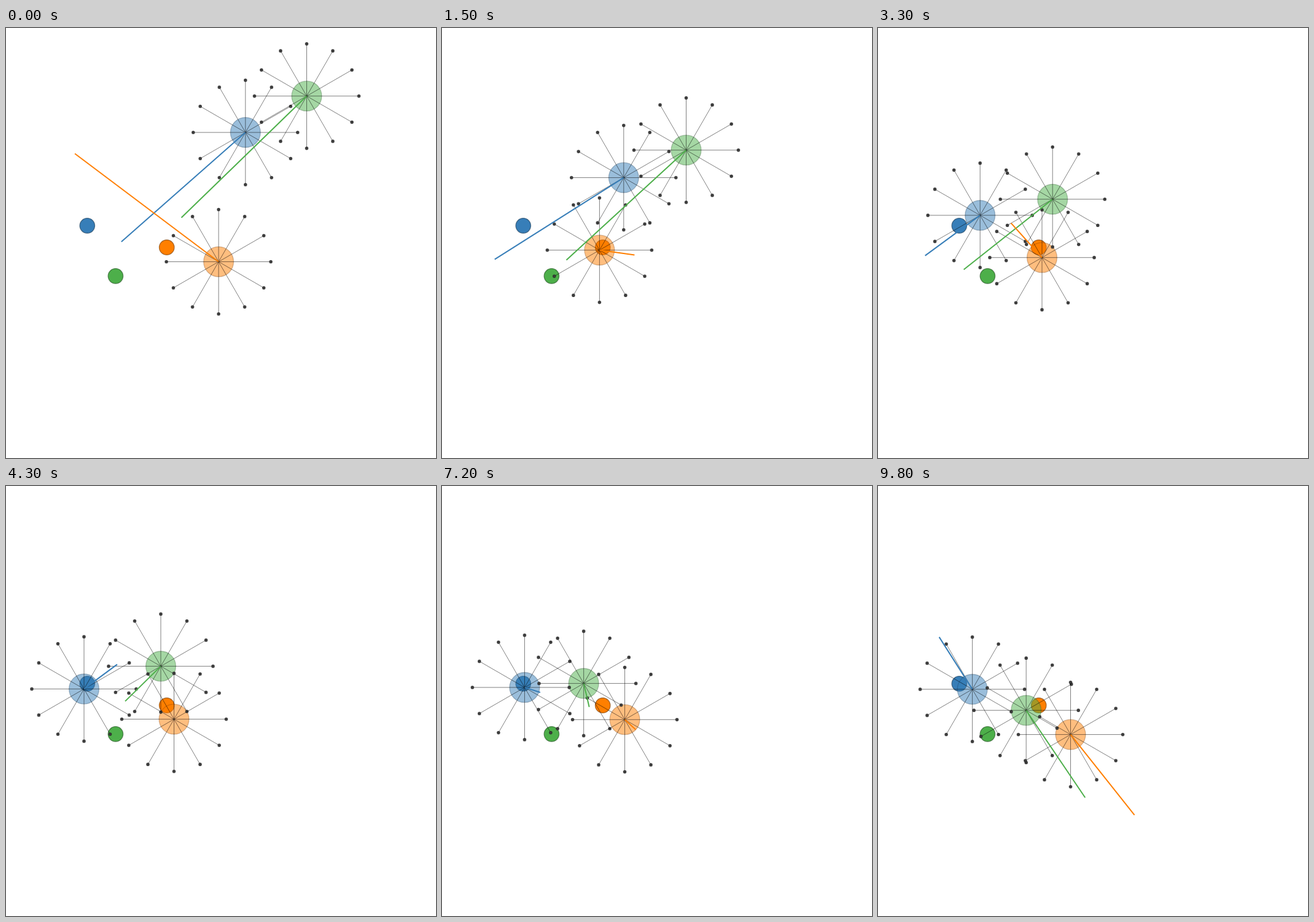
An HTML page with a canvas that plays this animation: 700 px wide and 700 px high, repeating every 9900 ms.

```html
<!DOCTYPE html>
<html>
<head>
<meta charset="utf-8">
<style>
  html, body { margin: 0; width: 100%; height: 100%; overflow: hidden; background: #fff; }
  canvas { display: block; }
</style>
</head>
<body>
<canvas id="stage" width="700" height="700"></canvas>
<script>
const ctx = document.getElementById('stage').getContext('2d');
const STEP = 100, STEPS = 99, TAU = Math.PI * 2;
const BODY = 24.4, GOAL = 12.2, REACH = 85, RAYS = 12;

// Steps at which the agents change course
const turns = [0, 15, 24, 43, 59, 84, 98];

// Position and thrust at each turn
const agents = [
  { rgb: [55, 126, 184], goal: [132.3, 321.8],
    x: [389.8, 295.8, 228.5, 127, 130, 140.5, 153.6],
    y: [170, 243.6, 269.2, 330.4, 329.7, 326.7, 330.9],
    dx: [-202, -210, -212, 54, 0, 48, -54],
    dy: [178, 133, 156, -40, 0, 11, -85] },
  { rgb: [77, 175, 74], goal: [178.4, 403.8],
    x: [489.5, 397.5, 331, 252, 240, 226, 241.2],
    y: [110.8, 198.8, 259, 293.4, 312.4, 331.2, 365.2],
    dx: [-204, -195, -198, -58, 1, 17, 96],
    dy: [198, 179, 166, 57, 38, 39, 142] },
  { rgb: [255, 127, 0], goal: [261.7, 357.2],
    x: [346.1, 256.4, 262, 273.5, 294, 300.7, 313.5],
    y: [380.5, 361.6, 366, 379.6, 378.2, 384.9, 404.6],
    dx: [-234, 57, -88, 0, 12, 25, 104],
    dy: [-176, 8, -98, 0, 13, 20, 131] }
];

// Distance covered from rest under steady thrust, with 25% damping per step
const travel = n => n - 3 * (1 - 0.75 ** n);
const knots = turns.map(travel);

// Tangent that never overshoots its neighbours
function slope(values, i) {
  const secant = j => (values[j + 1] - values[j]) / (knots[j + 1] - knots[j]);
  if (i === 0) return secant(0);
  if (i === values.length - 1) return secant(i - 1);
  const a = secant(i - 1), b = secant(i);
  return a * b <= 0 ? 0 : 2 * a * b / (a + b);
}

function sample(values, step) {
  let i = 0;
  while (i < turns.length - 2 && turns[i + 1] <= step) i++;
  const span = knots[i + 1] - knots[i];
  const u = (travel(step) - knots[i]) / span, v = 1 - u;
  return v * v * (1 + 2 * u) * values[i] + u * u * (3 - 2 * u) * values[i + 1] +
    span * u * v * (v * slope(values, i) - u * slope(values, i + 1));
}

function line(x, y, dx, dy, color, width) {
  ctx.beginPath();
  ctx.moveTo(x, y);
  ctx.lineTo(x + dx, y + dy);
  ctx.strokeStyle = color;
  ctx.lineWidth = width;
  ctx.stroke();
}

function disc(x, y, radius, rgb, alpha) {
  ctx.beginPath();
  ctx.arc(x, y, radius, 0, TAU);
  ctx.fillStyle = `rgba(${rgb}, ${alpha})`;
  ctx.fill();
  ctx.strokeStyle = `rgba(${rgb.map(c => c / 2 | 0)}, ${alpha * 0.65})`;
  ctx.lineWidth = 1.3;
  ctx.stroke();
}

// Length of a ray until it meets another agent's body
function rayLength(from, cos, sin, poses) {
  let length = REACH;
  for (const other of poses) {
    if (other === from) continue;
    const ox = other.x - from.x, oy = other.y - from.y;
    const along = ox * cos + oy * sin, across = ox * sin - oy * cos;
    if (along > 0 && Math.abs(across) < BODY)
      length = Math.min(length, along - Math.sqrt(BODY ** 2 - across ** 2));
  }
  return Math.max(length, 0);
}

function sensors(pose, poses) {
  for (let i = 0; i < RAYS; i++) {
    const cos = Math.cos(i * TAU / RAYS), sin = Math.sin(i * TAU / RAYS);
    const length = rayLength(pose, cos, sin, poses);
    line(pose.x, pose.y, length * cos, length * sin, 'rgba(0, 0, 0, 0.5)', 1);
    disc(pose.x + length * cos, pose.y + length * sin, 2.2, [64, 64, 64], 1);
  }
}

function draw(now) {
  const step = Math.floor(now / STEP) % STEPS;
  const poses = agents.map(a => ({
    rgb: a.rgb,
    x: sample(a.x, step), y: sample(a.y, step),
    dx: sample(a.dx, step), dy: sample(a.dy, step)
  }));
  ctx.clearRect(0, 0, 700, 700);
  agents.forEach(a => disc(...a.goal, GOAL, a.rgb, 1));
  poses.forEach(p => disc(p.x, p.y, BODY, p.rgb, 0.5));
  poses.forEach(p => sensors(p, poses));
  poses.forEach(p => line(p.x, p.y, p.dx, p.dy, `rgb(${p.rgb})`, 2));
  requestAnimationFrame(draw);
}
requestAnimationFrame(draw);
</script>
</body>
</html>
```
